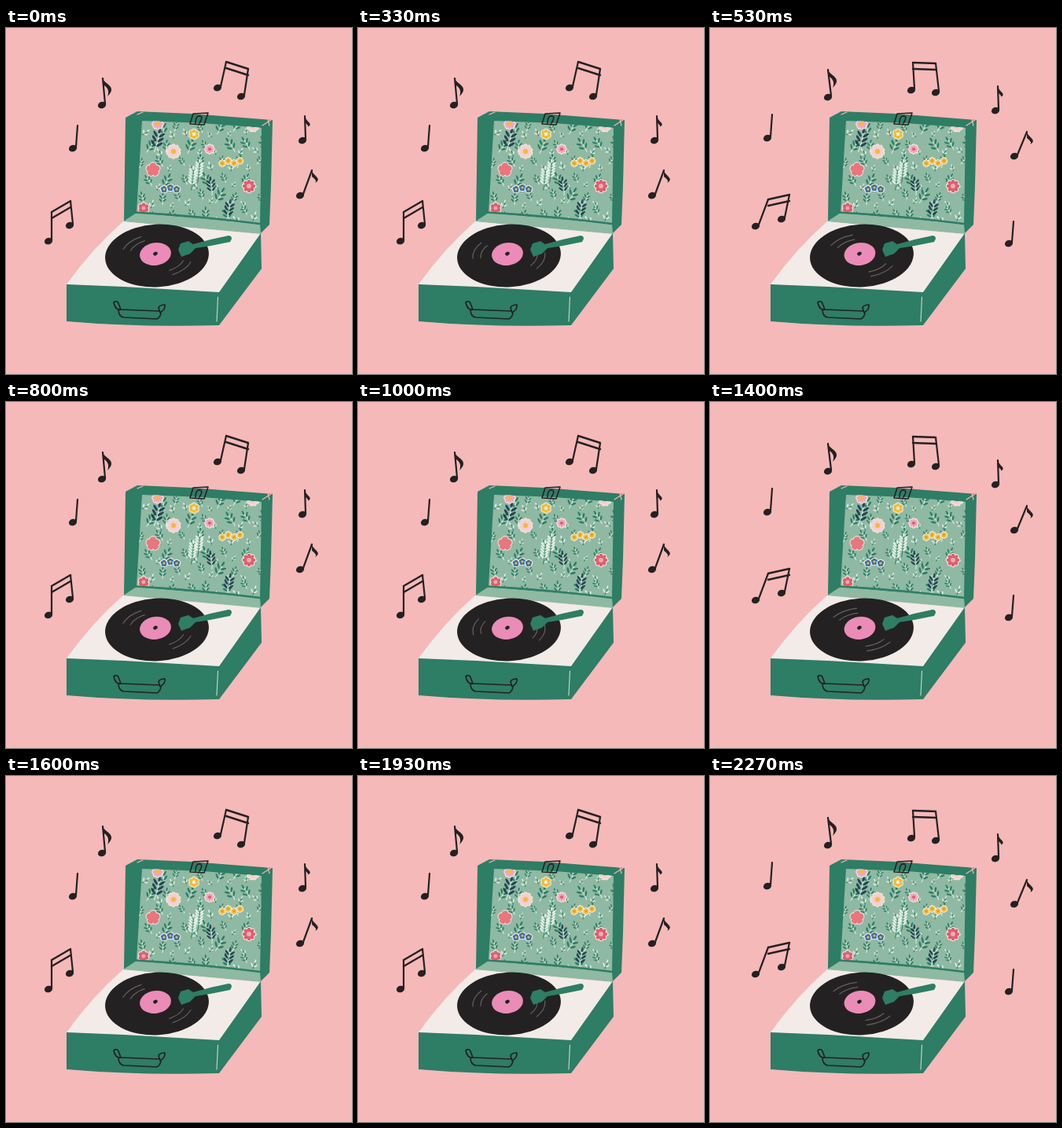
Animation, 440 px wide and 440 px high, one loop 2.39 s. Source, as an HTML page with a canvas:

```html
<!DOCTYPE html>
<html lang="en">
<head>
<meta charset="utf-8">
<title>Record player</title>
<style>
html, body { margin: 0; width: 100%; height: 100%; overflow: hidden; background: #f5b9b9; }
canvas { display: block; }
</style>
</head>
<body>
<canvas id="stage" width="440" height="440"></canvas>
<script>
const ctx = document.getElementById('stage').getContext('2d');
const LOOP = 2390, STEP = 1000 / 15, LAST_STEP = 34, STEPS_PER_POSE = 6;
const PINK = '#f5b9b9', GREEN = '#2e7d65', SAGE = '#8fb9a3', CREAM = '#f3ebe7', INK = '#242122';
const NAVY = '#264653', WHITE = '#e6f0e6', YELLOW = '#f0bd3c', ROSE = '#f3a5bb', RED = '#de5f6a', BLUE = '#3f6fa3';
const TURN = Math.PI * 2;

let seed;
function random(low, high) {
  seed = seed * 16807 % 2147483647;
  return low + (high - low) * seed / 2147483647;
}

function fill(d, color) {
  ctx.fillStyle = color;
  ctx.fill(new Path2D(d));
}
function stroke(d, color, width) {
  ctx.strokeStyle = color;
  ctx.lineWidth = width;
  ctx.stroke(new Path2D(d));
}
function oval(x, y, rx, ry, tilt, color) {
  ctx.beginPath();
  ctx.ellipse(x, y, rx, ry, tilt, 0, TURN);
  ctx.fillStyle = color;
  ctx.fill();
}

function sprig(x, y, height, tilt, color, pairs = 3) {
  const size = height / (pairs + 2);
  ctx.save();
  ctx.translate(x, y);
  ctx.rotate(tilt);
  stroke(`M0 ${height / 2}Q2 0 0 ${-height / 2}`, color === WHITE ? GREEN : WHITE, 1);
  for (let i = 0; i < pairs; i++) {
    const leafY = height * (0.2 - 0.65 * i / pairs);
    for (const side of [-1, 1]) {
      oval(side * size * 0.75, leafY - size * 0.4, size * 0.8, size * 0.28, side * -0.8, color);
    }
  }
  oval(0, -height / 2, size * 0.28, size * 0.7, 0, color);
  ctx.restore();
}

function bloom(x, y, r, petals, color, center) {
  const width = r * Math.min(0.45, 2.2 / petals);
  for (const [grow, tone] of [[1, CREAM], [0, color]]) {
    for (let i = 0; i < petals; i++) {
      const a = i * TURN / petals - TURN / 4;
      oval(x + Math.cos(a) * r * 0.55, y + Math.sin(a) * r * 0.55, r * 0.42 + grow, width + grow, a, tone);
    }
  }
  oval(x, y, r * 0.35, r * 0.35, 0, center);
}

function drawLining() {
  const shape = 'M173 118L250 121L325 127L323 249L166 234Z';
  fill(shape, SAGE);
  ctx.save();
  ctx.clip(new Path2D(shape));

  // Scattered foliage on a jittered, staggered grid
  seed = 41;
  for (let row = 0; row < 6; row++) {
    for (let column = 0; column < 7; column++) {
      const x = 170 + column * 25 + row % 2 * 12 + random(-5, 5);
      const y = 126 + row * 22 + random(-4, 4);
      sprig(x, y, random(10, 19), random(-0.6, 0.6), GREEN, 2);
      sprig(x + 12, y + 8, random(6, 10), random(-1, 1), WHITE, 1);
    }
  }

  sprig(192, 144, 28, 0.25, NAVY);
  sprig(261, 202, 21, -0.1, NAVY);
  sprig(283, 232, 23, 0.2, NAVY);
  for (const side of [0, 1]) sprig(237 + side * 8, 192 - side * 9, 28, 0.1, WHITE, 5);

  bloom(213, 157, 9, 10, '#f6cfcc', YELLOW);
  bloom(187, 180, 9, 5, '#e8777d', '#e8777d');
  bloom(239, 135, 6.5, 6, YELLOW, CREAM);
  bloom(259, 154, 6, 8, ROSE, RED);
  bloom(309, 201, 8.5, 8, RED, ROSE);
  bloom(314, 124, 8, 9, '#f6cfcc', YELLOW);
  bloom(193, 122, 7, 8, ROSE, YELLOW);
  bloom(175, 229, 7, 6, RED, ROSE);
  for (let i = 0; i < 4; i++) bloom(275 + i * 7.5, 172 + i % 2 * -3, 4, 6, YELLOW, '#d99a2b');
  for (let i = 0; i < 3; i++) bloom(201 + i * 8, 205 + i % 2 * -2, 4.5, 5, BLUE, YELLOW);
  ctx.restore();
}

function drawCase() {
  fill('M152 114L167 106L236 109L339 117L337 200L335 250L324 261L150 246Z', GREEN);
  drawLining();
  fill('M166 235L323 249L324 262L149 246Z', SAGE);
  stroke('M165 234.5Q245 239 323 249', GREEN, 2.4);
  fill('M149 246L324 262L271 337L77 326Q110 280 149 246Z', CREAM);
  fill('M77 326L150 329L271 336L324 261L325 306L271 378Q170 381 77 373Z', GREEN);
  stroke('M269.5 342L268 373', '#b9d4c5', 1.2);
  stroke('M326 124L337 117M333 116L335 124M167 110L174 107', PINK, 1.2);
  stroke('M238 109L257 108L252 123L234 122ZM241 121Q241 111 247 112Q251 113 246 121', INK, 1.6);
  stroke('M137 349Q141 346 143 350L146 358Q139 359 137 349M143 358Q143 367 150 368L192 370Q197 367 197 361M194 356Q195 352 202 352Q203 358 196 362ZM146 358L195 360', INK, 1.7);
}

function drawRecord(step, shift) {
  const x = 192 + shift, y = 289.5, tilt = -0.06;
  oval(x, y, 66, 39.8, tilt, INK);

  // Groove highlights sway as the disc turns, mirrored across the label
  const angle = 0.66 + 0.44 * Math.cos((step - 9.5) / (2 * STEPS_PER_POSE) * TURN);
  ctx.strokeStyle = '#656061';
  ctx.lineWidth = 1.2;
  for (const radius of [36, 46]) {
    for (const side of [0, TURN / 2]) {
      ctx.beginPath();
      ctx.ellipse(x, y, radius, radius * 0.6, tilt, angle + side - 0.38, angle + side + 0.38);
      ctx.stroke();
    }
  }
  oval(190 + shift * 0.5, 287.5, 20, 14.3, -0.15, '#ea8cb7');
  oval(190, 287, 2.9, 2.2, -0.5, INK);
  fill('M219 282L222 274L232 271L238 275L260 269L283 264Q287 264 287 268L285 272L260 277L241 280L234 287L223 291Z', GREEN);
}

// The head sits at x, y; the stem rises by height and leans sideways
function note(x, y, height, lean, flag = 0) {
  const left = x + 4, top = y - height, tipX = left + lean;
  oval(x, y, 5.2, 4.2, -0.35, INK);
  stroke(`M${left} ${y - 2}L${tipX} ${top}`, INK, 2.2);
  if (flag) {
    const endX = tipX + flag * 0.6, endY = top + flag * 2.3;
    fill(`M${tipX} ${top}C${tipX + 1} ${top + 7} ${tipX + flag * 2} ${top + 10} ${endX} ${endY}Q${tipX + flag} ${top + 13} ${tipX} ${top + 8}Z`, INK);
  }
  return [tipX, top];
}

function beamedPair(first, second) {
  const [x1, y1] = note(...first), [x2, y2] = note(...second);
  for (const drop of [0, 8]) stroke(`M${x1} ${y1 + drop}L${x2} ${y2 + drop}`, INK, 2.4);
}

const poses = [
  () => {
    beamedPair([269, 76, 33, 7], [299, 87, 35, 5]);
    beamedPair([54, 271, 37, 0], [81, 251, 31, -3]);
    note(122, 98, 34, -3, 10);
    note(85, 153, 29, 2);
    note(377, 143, 31, -1, 6);
    note(374, 213, 32, 11, 7);
  },
  () => {
    beamedPair([256, 79, 35, -2], [287, 82, 37, -4]);
    beamedPair([58, 252, 34, 12], [91, 243, 31, 6]);
    note(150, 88, 35, -4, 10);
    note(73, 140, 30, 2);
    note(363, 105, 31, -1, 6);
    note(387, 163, 31, 12, 7);
    note(380, 274, 28, 2);
  }
];

function draw(time) {
  const step = Math.min(LAST_STEP, Math.floor((time % LOOP + 4) / STEP));
  const pose = Math.floor(step / STEPS_PER_POSE) % 2;
  ctx.fillStyle = PINK;
  ctx.fillRect(0, 0, 440, 440);
  drawCase();
  drawRecord(step, pose);
  poses[pose]();
}

function tick() {
  draw(performance.now());
  requestAnimationFrame(tick);
}
ctx.lineCap = ctx.lineJoin = 'round';
tick();
</script>
</body>
</html>
```
